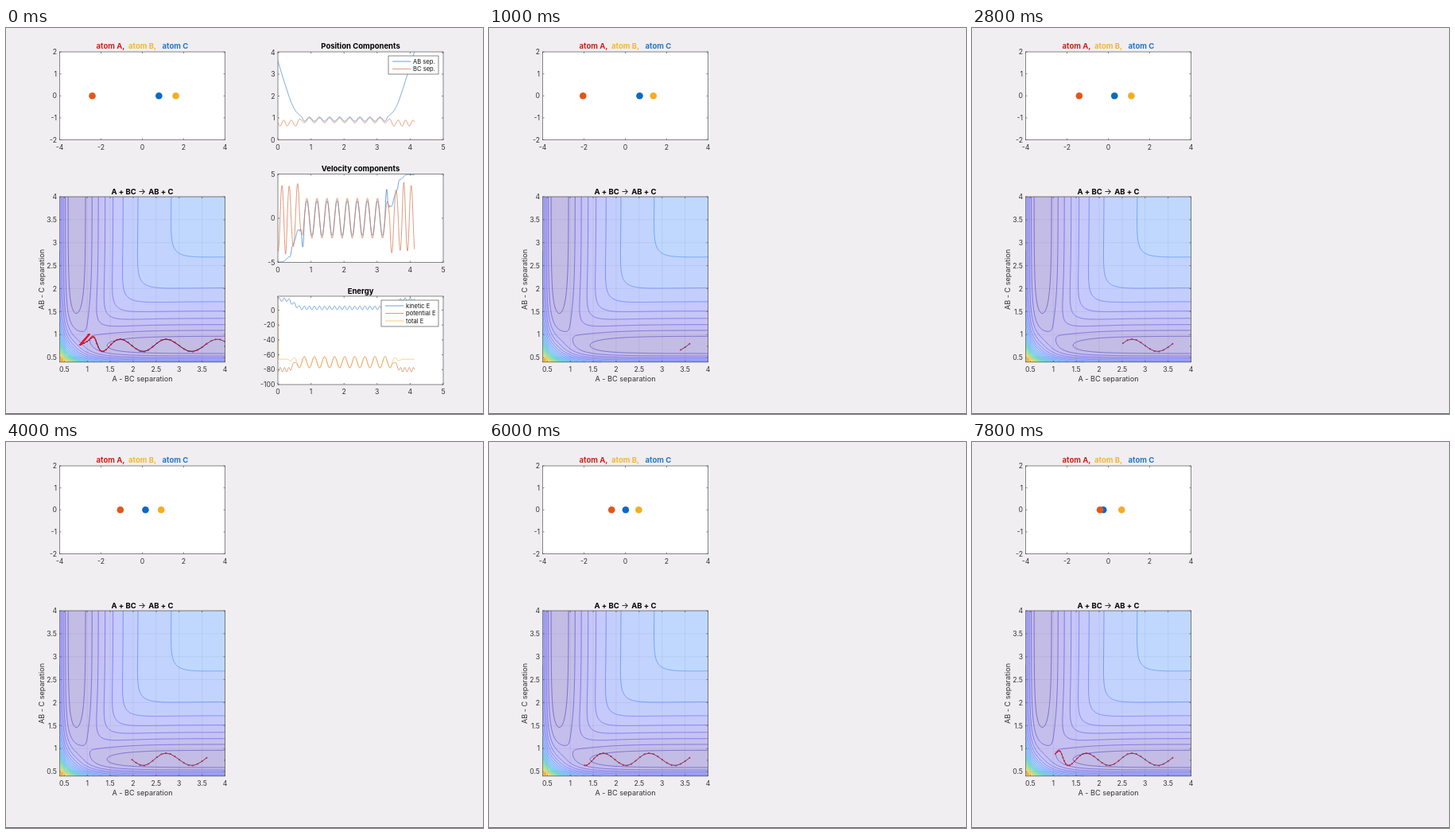
These frames come from a looping animation (600 px wide and 485 px high, 8000 ms). An HTML page with a canvas:

```html
<!DOCTYPE html>
<html lang="en">
<head>
<meta charset="utf-8">
<title>Collinear atom exchange</title>
<style>
html, body { margin: 0; width: 100%; height: 100%; overflow: hidden; background: #f0eef1; }
canvas { display: block; width: 600px; height: 485px; }
</style>
</head>
<body>
<canvas id="stage" width="600" height="485"></canvas>
<script>
const stage = document.getElementById('stage').getContext('2d');
let ctx = stage;
const FRAME_MS = 200, FRAMES = 40, STEP = 0.02, END = 4.13, MID = 2.02;
const RED = '#e2561b', BLUE = '#0a6ac2', YELLOW = '#f3ae22';
const CURVE_BLUE = '#3a82d0', CURVE_ORANGE = '#d27a52', CURVE_YELLOW = '#f0bd55';

const range = (a, b, d) => Array.from({ length: Math.round((b - a) / d) + 1 }, (_, i) => a + i * d);
const mix = (a, b, u) => a + (b - a) * u;
const clamp01 = u => Math.max(0, Math.min(1, u));

// ---- Trajectory: the collision mirrors itself around MID ----
const approach = [[-2, 4.09], [3, 3.6], [14, 2.52], [20, 1.975], [24, 1.648],
  [30, 1.312], [36, 1.13], [39, 1.045], [43, 0.85]];
const vibration = [[-5, 0.63], [0.6, 0.9], [6.3, 0.63], [12, 0.9], [17.2, 0.63],
  [23, 0.9], [29.6, 0.63], [36, 0.95], [43, 0.78]];
const CONTACT = 0.8, PERIOD = (MID - CONTACT) / 4;

function segment(nodes, n) {
  let i = 0;
  while (i < nodes.length - 2 && n > nodes[i + 1][0]) i++;
  return i;
}

function hermite(nodes, n) {
  const i = segment(nodes, n), [a, p] = nodes[i], [b, q] = nodes[i + 1];
  const slope = k => {
    if (k === nodes.length - 1) return 0;
    const l = nodes[Math.max(0, k - 1)], r = nodes[k + 1];
    return (r[1] - l[1]) / (r[0] - l[0]);
  };
  const h = b - a, u = (n - a) / h, v = 1 - u;
  return p * v * v * (1 + 2 * u) + q * u * u * (3 - 2 * u)
    + h * u * v * (v * slope(i) - u * slope(i + 1));
}

function swing(nodes, n) {
  const i = segment(nodes, n), [a, p] = nodes[i], [b, q] = nodes[i + 1];
  return mix(p, q, (1 - Math.cos(Math.PI * (n - a) / (b - a))) / 2);
}

const fold = t => MID - Math.abs(t - MID);
const ripple = (t, period) => Math.cos(2 * Math.PI * (t - MID) / period);

function separations(t) {
  const s = fold(t), n = 3 + s / STEP;
  if (s < CONTACT) return [hermite(approach, n), swing(vibration, n)];
  const c = ripple(s, PERIOD);
  return [0.945 - 0.095 * c, 0.89 - 0.11 * c];
}

// ---- Energy surface (LEPS), in units of the well depth ----
const SATO = -0.025, LEVEL = 0.119, FLOOR = -0.9989;

function bond(r, depth, a) {
  const u = Math.exp(-a * (r - 0.742)), w = u * u, k = depth / 4 / (1 + SATO);
  return [k * ((3 + SATO) * w - (2 + 6 * SATO) * u), k * ((1 + 3 * SATO) * w - (6 + 2 * SATO) * u)];
}

function potential(x, y) {
  const [q1, j1] = bond(x, 0.985, 1.78), [q2, j2] = bond(y, 1, 1.915), [q3, j3] = bond(x + y, 1, 1.915);
  return q1 + q2 + q3 - Math.sqrt(((j1 - j2) ** 2 + (j2 - j3) ** 2 + (j3 - j1) ** 2) / 2);
}

const palette = [[62, 38, 168], [69, 56, 215], [72, 82, 244], [53, 122, 252], [42, 150, 236],
  [18, 178, 200], [54, 200, 147], [128, 204, 89], [200, 193, 41], [253, 190, 61], [249, 251, 21]];

function shade(index) {
  const p = clamp01(index / 25) * 10, i = Math.min(9, Math.floor(p));
  return palette[i].map((c, k) => Math.round(mix(c, palette[i + 1][k], p - i)));
}

// ---- Axes ----
const view = (left, right, top, bottom, xMin, xMax, yMin, yMax) => ({
  left, right, top, bottom,
  x: v => left + (v - xMin) / (xMax - xMin) * (right - left),
  y: v => bottom - (v - yMin) / (yMax - yMin) * (bottom - top)
});
const atoms = view(67.5, 275.5, 30, 140.5, -4, 4, -2, 2);
const surface = view(67.5, 275.5, 212, 419.8, 0.4, 4, 0.4, 4);
const position = view(342, 550, 30, 140.5, 0, 5, 0, 4.02);
const velocity = view(342, 550, 183.5, 294.5, 0, 5, -5, 5);
const energy = view(342, 550, 337, 448, 0, 5, -100, 18.7);

function text(s, x, y, size = 8.7, align = 'center', color = '#333', weight = 400) {
  ctx.font = `${weight} ${size}px Inter, "Liberation Sans", sans-serif`;
  ctx.textAlign = align;
  ctx.textBaseline = 'alphabetic';
  ctx.fillStyle = color;
  ctx.fillText(s, x, y);
}
const title = (s, x, y, color = '#000', align = 'center') => text(s, x, y, 9.5, align, color, 700);

function line(points, color, width = 0.8) {
  ctx.beginPath();
  for (const [x, y] of points) ctx.lineTo(x, y);
  ctx.strokeStyle = color;
  ctx.lineWidth = width;
  ctx.stroke();
}

function dot(x, y, r, color) {
  ctx.beginPath();
  ctx.arc(x, y, r, 0, 7);
  ctx.fillStyle = color;
  ctx.fill();
}

function paper(v) {
  ctx.fillStyle = '#fff';
  ctx.fillRect(v.left, v.top, v.right - v.left, v.bottom - v.top);
}

function frame(v, xTicks, yTicks) {
  const { left, right, top, bottom } = v;
  ctx.strokeStyle = '#555';
  ctx.lineWidth = 0.7;
  ctx.strokeRect(left, top, right - left, bottom - top);
  for (const t of xTicks) {
    const x = v.x(t);
    line([[x, bottom], [x, bottom - 2]], '#555', 0.7);
    line([[x, top], [x, top + 2]], '#555', 0.7);
    text(String(t), x, bottom + 12);
  }
  for (const t of yTicks) {
    const y = v.y(t);
    line([[left, y], [left + 2, y]], '#555', 0.7);
    line([[right, y], [right - 2, y]], '#555', 0.7);
    text(String(t), left - 3.5, y + 3.2, 8.7, 'right');
  }
}

// ---- Left column ----
function fillBands() {
  const w = 208, image = ctx.createImageData(w, w);
  for (let j = 0; j < w; j++) for (let i = 0; i < w; i++) {
    const v = potential(0.4 + (i + 0.5) / w * 3.6, 4 - (j + 0.5) / w * 3.6);
    const color = shade(Math.max(0, Math.floor((v - FLOOR) / LEVEL)));
    image.data.set([...color.map(c => mix(255, c, 0.31)), 255], 4 * (j * w + i));
  }
  ctx.putImageData(image, 68, 212);
}

function contours() {
  const cells = 208, d = 3.6 / cells;
  const grid = range(0, cells, 1).map(i => range(0, cells, 1).map(j => potential(0.4 + i * d, 0.4 + j * d)));
  const corners = [[0, 0], [1, 0], [1, 1], [0, 1]];
  for (let k = 0; k < 34; k++) {
    const level = k * LEVEL + FLOOR;
    ctx.beginPath();
    for (let i = 0; i < cells; i++) for (let j = 0; j < cells; j++) {
      const hits = [];
      corners.forEach(([ax, ay], c) => {
        const [bx, by] = corners[(c + 1) % 4];
        const a = grid[i + ax][j + ay] - level, b = grid[i + bx][j + by] - level;
        if (a < 0 === b < 0) return;
        const u = a / (a - b);
        hits.push([surface.x(0.4 + (i + mix(ax, bx, u)) * d), surface.y(0.4 + (j + mix(ay, by, u)) * d)]);
      });
      for (let h = 0; h + 1 < hits.length; h += 2) {
        ctx.moveTo(...hits[h]);
        ctx.lineTo(...hits[h + 1]);
      }
    }
    ctx.strokeStyle = `rgb(${shade(k)})`;
    ctx.lineWidth = 0.55;
    ctx.stroke();
  }
}

function drawLeftPanels() {
  const ticks = range(0.5, 4, 0.5);
  paper(atoms);
  frame(atoms, range(-4, 4, 2), range(-2, 2, 1));
  title('atom A,', 113.5, 26.3, '#cf2018', 'left');
  title('atom B,', 154, 26.3, '#f4b632', 'left');
  title('atom C', 196.5, 26.3, '#2277c8', 'left');

  fillBands();
  ctx.setLineDash([1, 1]);
  for (const t of ticks) {
    line([[surface.x(t), surface.top], [surface.x(t), surface.bottom]], 'rgba(60,60,90,.18)', 0.8);
    line([[surface.left, surface.y(t)], [surface.right, surface.y(t)]], 'rgba(60,60,90,.18)', 0.8);
  }
  ctx.setLineDash([]);
  contours();
  ctx.fillStyle = '#f2b04c';
  ctx.fillRect(68, 415, 4, 4.5);
  frame(surface, ticks, ticks);
  title('A + BC', 132.5, 208.8, '#000', 'left');
  text('→', 171, 208.8, 10, 'center', '#000');
  title('AB + C', 210.5, 208.8, '#000', 'right');
  text('A - BC separation', 171.5, 443.5, 9.1);
  ctx.save();
  ctx.translate(48, 316);
  ctx.rotate(-Math.PI / 2);
  text('AB - C separation', 0, 0, 9.1);
  ctx.restore();
}

// ---- Right column ----
function plot(v, f, color) {
  ctx.save();
  ctx.beginPath();
  ctx.rect(v.left, v.top, v.right - v.left, v.bottom - v.top);
  ctx.clip();
  line(range(0, END, 0.005).map(t => [v.x(t), v.y(f(t))]), color, 0.75);
  ctx.restore();
}

function legend(left, top, height, entries) {
  ctx.fillStyle = '#fff';
  ctx.fillRect(left, top, 544 - left, height);
  ctx.strokeStyle = '#555';
  ctx.lineWidth = 0.7;
  ctx.strokeRect(left, top, 544 - left, height);
  entries.forEach(([name, color], i) => {
    const y = top + 7 + i * 9.5;
    line([[left + 5, y], [left + 28, y]], color, 0.75);
    text(name, left + 31, y + 2.8, 7.6, 'left', '#111');
  });
}

const speed = k => t => (separations(t + 0.003)[k] - separations(t - 0.003)[k]) / 0.006;
const blend = t => clamp01((fold(t) - 0.3) / 0.35);
const strain = t => -70 + 7.5 * ripple(t, PERIOD);
const kinetic = t => mix(14, 3, blend(t)) + 2.4 * ripple(t, PERIOD / 2);
const bound = t => mix(-80 + 3 * ripple(t, 0.13), strain(t), blend(t));
const total = t => t < 0.01 ? mix(18, -66, t / 0.01) : mix(-66, strain(t), blend(t));

function drawRightPanels() {
  const xTicks = range(0, 5, 1);
  paper(position);
  plot(position, t => separations(t)[0], CURVE_BLUE);
  plot(position, t => separations(t)[1], CURVE_ORANGE);
  frame(position, xTicks, range(0, 4, 1));
  title('Position Components', 446, 26.3);
  legend(481, 35, 23, [['AB sep.', CURVE_BLUE], ['BC sep.', CURVE_ORANGE]]);

  paper(velocity);
  plot(velocity, speed(0), CURVE_BLUE);
  plot(velocity, speed(1), CURVE_ORANGE);
  frame(velocity, xTicks, [-5, 0, 5]);
  title('Velocity components', 446, 180);

  paper(energy);
  plot(energy, kinetic, CURVE_BLUE);
  plot(energy, bound, CURVE_ORANGE);
  plot(energy, total, CURVE_YELLOW);
  frame(energy, xTicks, range(-100, 0, 20));
  title('Energy', 446, 333.5);
  legend(472, 342, 33, [['kinetic E', CURVE_BLUE], ['potential E', CURVE_ORANGE], ['total E', CURVE_YELLOW]]);
}

// ---- Moving parts ----
function drawAtoms(t) {
  const [ab, bc] = separations(t), b = (ab + bc) / 3;
  for (const [p, color] of [[b, YELLOW], [b - bc, BLUE], [b - ab, RED]]) {
    dot(atoms.x(p), atoms.y(0), 4.3, color);
  }
}

function drawTrail(t) {
  const points = range(0, t, STEP).map(s => {
    const [ab, bc] = separations(s);
    return [surface.x(ab), surface.y(bc)];
  });
  ctx.save();
  ctx.beginPath();
  ctx.rect(surface.left, surface.top, 208, 208);
  ctx.clip();
  line(points, '#35205c', 0.8);
  for (const [x, y] of points) dot(x, y, 1, '#e0182c');
  ctx.restore();
}

function layer(draw) {
  const canvas = document.createElement('canvas');
  canvas.width = 600;
  canvas.height = 485;
  ctx = canvas.getContext('2d');
  draw();
  ctx = stage;
  return canvas;
}

const leftPanels = layer(drawLeftPanels), rightPanels = layer(drawRightPanels);

function render(now) {
  const n = Math.floor(now / FRAME_MS) % FRAMES;
  ctx.fillStyle = '#f0eef1';
  ctx.fillRect(0, 0, 600, 485);
  ctx.fillStyle = '#66656a';
  ctx.fillRect(0, 484, 600, 1);
  // The figure is cleared for one step before the run starts again.
  if (n !== 1) {
    const t = n === 0 ? END : Math.max(0, n - 3) * STEP;
    ctx.drawImage(leftPanels, 0, 0);
    if (n === 0) ctx.drawImage(rightPanels, 0, 0);
    drawAtoms(t);
    if (n !== 2) drawTrail(t);
  }
}

const start = performance.now();
function tick() {
  render(performance.now() - start);
  requestAnimationFrame(tick);
}
tick();
</script>
</body>
</html>
```
